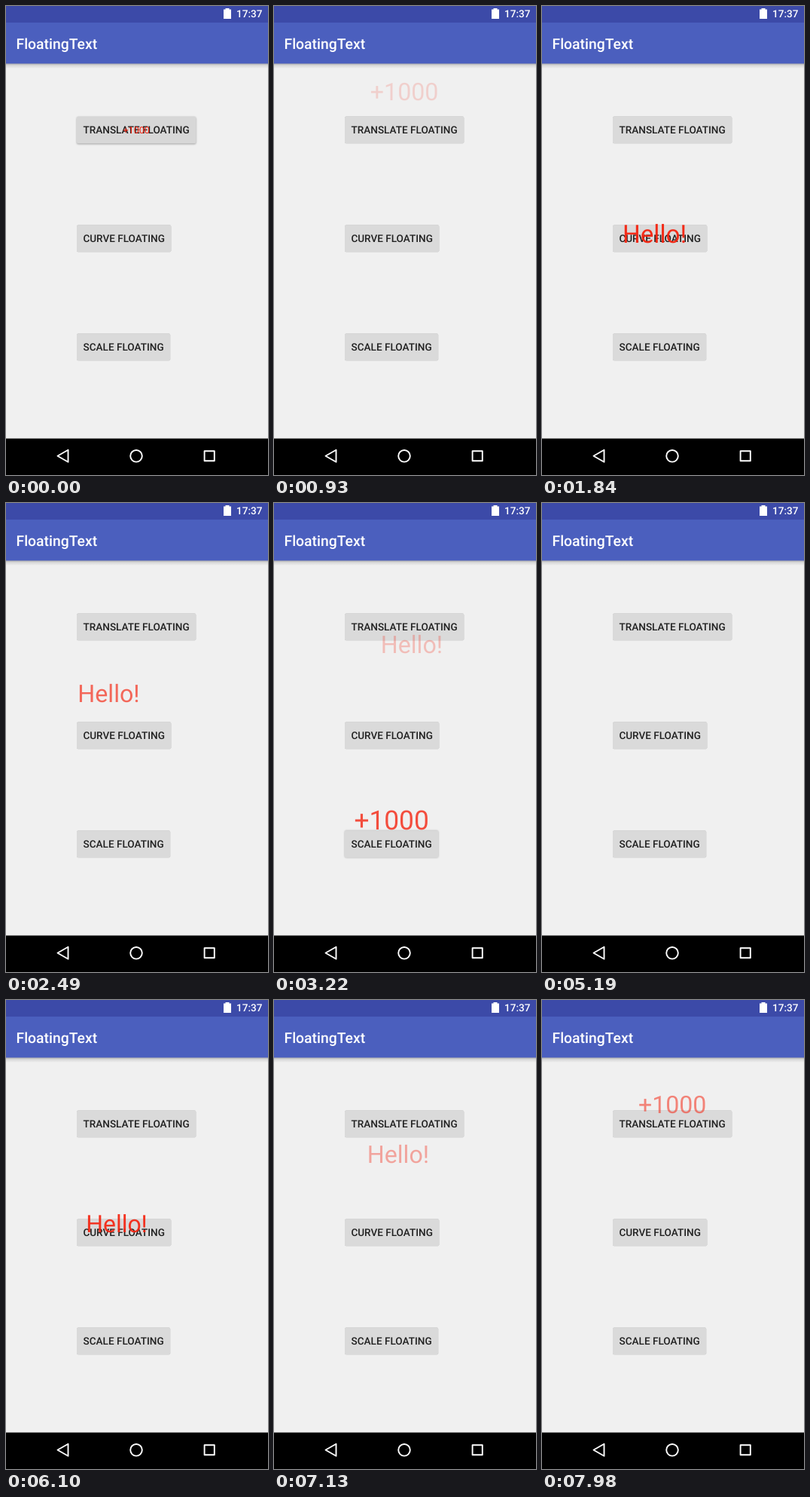
Recreate the animation shown at these times as an HTML page. Size 348 by 622 pixels, loop 8000 ms.

```html
<!DOCTYPE html>
<html lang="en">
<head>
<meta charset="utf-8">
<title>FloatingText</title>
<style>
  html, body { margin: 0; width: 100%; height: 100%; overflow: hidden; background: #f0f0f0; }
  svg { display: block; width: 100vw; height: 100vh; font-family: Roboto, sans-serif; text-rendering: geometricPrecision; }
  .label { font-size: 13.55px; font-weight: 500; fill: #212121; text-anchor: middle; }
  .float { font-size: 32.2px; fill: #f5230f; text-anchor: middle; }
</style>
</head>
<body>
<svg viewBox="0 0 348 622">
  <defs>
    <linearGradient id="drop" x2="0" y2="1">
      <stop offset="0" stop-color="#000" stop-opacity=".3"/>
      <stop offset=".4" stop-color="#000" stop-opacity=".1"/>
      <stop offset="1" stop-color="#000" stop-opacity="0"/>
    </linearGradient>
  </defs>
  <rect width="348" height="622" fill="#f0f0f0"/>
  <rect y="76" width="348" height="7" fill="url(#drop)"/>
  <rect width="348" height="76.4" fill="#4b5fbe"/>
  <rect width="348" height="22" fill="#3c4aa8"/>
  <path d="M289 4.5h2.5v-1.5h5v1.5h2.5v12.5h-10z" fill="#fff"/>
  <text x="340.5" y="15.2" font-size="13.55" font-weight="500" text-anchor="end" fill="#fff">17:37</text>
  <text x="13.5" y="56.8" font-size="19.33" font-weight="500" fill="#fff">FloatingText</text>

  <g id="buttons"></g>
  <g id="floats"></g>

  <rect y="573.6" width="348" height="48.4" fill="#000"/>
  <g fill="none" stroke="#fff" stroke-width="1.9" stroke-linejoin="round">
    <path d="M68.5 596.8L82.5 588.8V604.8Z"/>
    <circle cx="173" cy="596.8" r="7.8"/>
    <rect x="263.6" y="590.3" width="13.2" height="13"/>
  </g>
</svg>
<script>
const LOOP = 8000;
const PX = 0.322;          // device pixel to stage pixel
const DELAY = 66;          // movement starts a little after the fade
const MIN_ALPHA = 0.05;

const make = (tag, attrs, parent, text = '') => {
  const el = document.createElementNS('http://www.w3.org/2000/svg', tag);
  for (const key in attrs) el.setAttribute(key, attrs[key]);
  el.textContent = text;
  if (parent) parent.append(el);
  return el;
};
const clamp = v => Math.min(1, Math.max(0, v));
const ease = v => (1 - Math.cos(Math.PI * clamp(v))) / 2;

// Underdamped spring from 0 to 1, time in ms
const spring = ms => {
  const t = ms / 1000, decay = 8.9, freq = 12;
  return 1 - Math.exp(-decay * t) * (Math.cos(freq * t) + decay / freq * Math.sin(freq * t));
};

const curve = make('path', { d: 'M0 0Q-100-200 0-300Q200-400 0-500' });
const curveLength = curve.getTotalLength();

const kinds = {
  translate: {
    label: 'TRANSLATE FLOATING', x: 94, y: 146.6, width: 158.3,
    text: '+1000', duration: 1350, shift: 0,
    move: p => ({ x: 0, y: -200 * p })
  },
  curve: {
    label: 'CURVE FLOATING', x: 94, y: 290.6, width: 125.3,
    text: 'Hello!', duration: 2620, shift: -4.1,
    move: p => curve.getPointAtLength(p * curveLength)
  },
  scale: {
    label: 'SCALE FLOATING', x: 94, y: 434.6, width: 124.2,
    text: '+1000', duration: 900, shift: 0,
    move: () => ({ x: 0, y: -100 })
  }
};

const events = [
  { kind: kinds.translate, press: -160, start: -75 },
  { kind: kinds.curve, press: 1350, start: 1465 },
  { kind: kinds.scale, press: 2890, start: 2950 },
  { kind: kinds.scale, press: 4290, start: 4380 },
  { kind: kinds.curve, press: 5540, start: 5600 },
  { kind: kinds.translate, press: 7230, start: 7333 }
];

const buttons = document.getElementById('buttons');
const floats = document.getElementById('floats');

for (const kind of Object.values(kinds)) {
  kind.cx = kind.x + kind.width / 2;
  kind.cy = kind.y + 17.8;
  kind.face = make('rect', { x: kind.x, y: kind.y, width: kind.width, height: 35.6, rx: 1.8, fill: '#dadada' }, buttons);
  make('text', { class: 'label', x: kind.cx, y: kind.cy + 4.6 }, buttons, kind.label);
}
for (const event of events) {
  event.el = make('text', { class: 'float', x: event.kind.shift, y: 11.4 }, floats, event.kind.text);
}

function drawFloat({ kind, start, el }, time) {
  const age = time - start;
  const alpha = 1 - ease(age / kind.duration);
  const visible = age > 0 && alpha > MIN_ALPHA;
  el.setAttribute('visibility', visible ? 'visible' : 'hidden');
  if (!visible) return;
  const pos = kind.move(ease((age - DELAY) / kind.duration));
  const x = kind.cx + pos.x * PX, y = kind.cy + pos.y * PX;
  el.setAttribute('opacity', alpha.toFixed(3));
  el.setAttribute('transform', `translate(${x} ${y}) scale(${spring(age)})`);
}

function drawButton(kind, time) {
  let lift = 0;
  for (const event of events) {
    if (event.kind !== kind) continue;
    const age = time - event.press;
    lift = Math.max(lift, Math.min(clamp(age / 100), clamp((400 - age) / 200)));
  }
  const grey = 218 - Math.round(3 * lift);
  kind.face.setAttribute('fill', `rgb(${grey},${grey},${grey})`);
  kind.face.style.filter =
    `drop-shadow(0 ${0.8 + 0.4 * lift}px ${0.7 + 0.5 * lift}px rgba(0,0,0,${0.26 + 0.06 * lift}))`;
}

function draw(time) {
  for (const kind of Object.values(kinds)) drawButton(kind, time);
  for (const event of events) drawFloat(event, time);
}

const origin = performance.now();
function tick() {
  draw((performance.now() - origin) % LOOP);
  requestAnimationFrame(tick);
}
draw(0);
requestAnimationFrame(tick);
</script>
</body>
</html>
```
